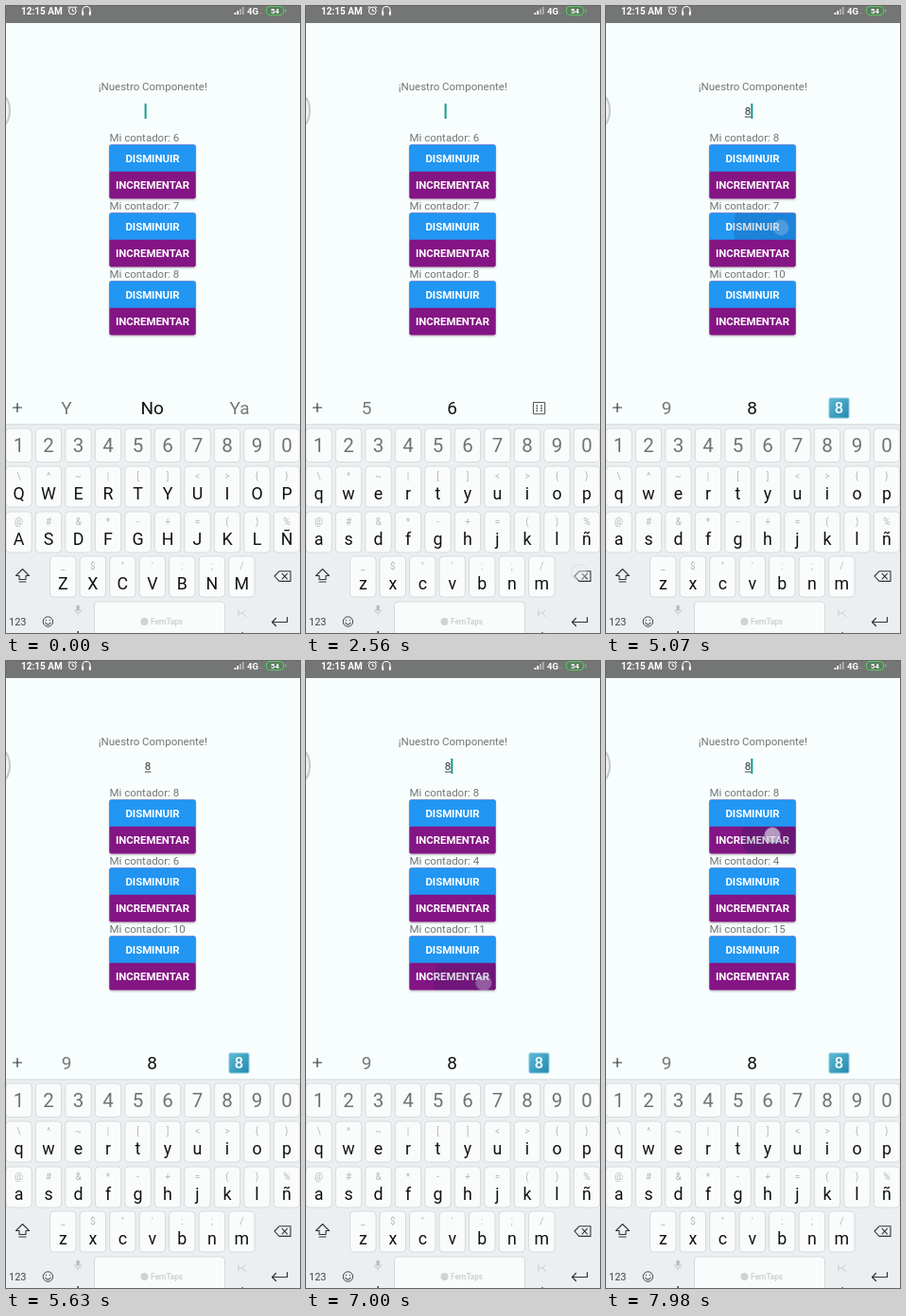
Recreate the animation shown at these times as an HTML page. Size 311x662 px, loop 8 s.

```html
<!DOCTYPE html>
<html lang="es">
<head>
<meta charset="utf-8">
<title>Contadores</title>
<style>
  html, body { margin: 0; width: 100%; height: 100%; overflow: hidden; background: #f8fefe; }
  svg { display: block; width: 311px; height: 662px; font-family: Roboto, "Noto Sans", sans-serif; }
</style>
</head>
<body>
<svg id="stage" viewBox="0 0 311 662" xmlns="http://www.w3.org/2000/svg"></svg>
<script>
const LOOP = 8000;
const stage = document.getElementById('stage');

const text = (x, y, s, size, fill, extra = '') =>
  `<text x="${x}" y="${y}" font-size="${size}" fill="${fill}" ${extra}>${s}</text>`;
const mid = (x, y, s, size, fill, extra = '') =>
  text(x, y, s, size, fill, 'text-anchor="middle" ' + extra);
const rect = (x, y, w, h, r, fill, extra = '') =>
  `<rect x="${x}" y="${y}" width="${w}" height="${h}" rx="${r}" fill="${fill}" ${extra}/>`;
const line = (d, color, w = 1, extra = '') =>
  `<path d="${d}" fill="none" stroke="${color}" stroke-width="${w}" stroke-linecap="round" stroke-linejoin="round" ${extra}/>`;
const esc = c => c.replace('&', '&amp;').replace('<', '&lt;').replace('>', '&gt;');

function statusBar() {
  const bars = [0, 1, 2, 3].map(i =>
    rect(241.5 + i * 2.8, 7 - i * 2, 1.8, 2 + i * 2, 0, '#fff', i > 1 ? 'opacity=".45"' : '')).join('');
  return rect(0, 0, 311, 18, 0, '#747675') +
    text(16, 9, '12:15 AM', 10, '#fff', 'font-weight="700"') +
    '<circle cx="70.3" cy="5" r="3.9" fill="none" stroke="#fff"/>' +
    line('M70.3 3V5.3H72M65.8 1.8L67.5 .4M74.8 1.8L73.1 .4', '#fff') +
    line('M81 8V4.5A4 4 0 0 1 89 4.5V8', '#fff', 1.1) +
    line('M81.2 6.5V9M88.8 6.5V9', '#fff', 2) + bars +
    text(255, 9, '4G', 9.5, '#fff', 'font-weight="700"') +
    text(268, 8, '..', 7, '#fff', 'opacity=".6"') +
    rect(275.5, .5, 18, 9, 4, '#5f7a62', 'stroke="#58c463" stroke-width="1.2"') +
    rect(295, 3.3, 1.5, 3.4, .7, '#58c463') +
    mid(284.5, 8, '54', 7.8, '#fff', 'font-weight="700"');
}

function counter(i) {
  const y = 146.5 + i * 72;
  const button = (dy, fill, label) =>
    rect(109.5, y + dy, 91, 28.3, 1.6, fill) +
    mid(155, y + dy + 18.5, label, 11.4, '#fff', 'font-weight="700"');
  return text(109.5, y - 3.3, '', 11.5, '#757575', `id="count${i}"`) +
    rect(109.5, y, 91, 56.7, 1.6, '#841584', 'filter="url(#shade)"') +
    button(0, '#2196f3', 'DISMINUIR') + button(28.4, '#841584', 'INCREMENTAR');
}

const PITCH = 31.5;
function key(cx, y, h, id = '') {
  return rect(cx - 13.7, y, 27.4, h, 4, '#fafcfc', `stroke="#d3d7da" stroke-width=".9" ${id && `id="${id}"`}`);
}

function keyRow(x, y, letters, hints) {
  return [...letters].map((c, i) => {
    const cx = x + i * PITCH;
    return key(cx, y, 43) + mid(cx, y + 13.5, esc(hints[i]), 10, '#b4b7b9') +
      mid(cx, y + 35, c, 17.8, '#111', 'class="letter"');
  }).join('');
}

function keyboard() {
  const digits = [...'1234567890'].map((c, i) => {
    const cx = 13.5 + i * PITCH;
    return key(cx, 446, 35.5, 'digit' + c) + mid(cx, 471.2, c, 20.5, '#707375');
  }).join('');
  return rect(0, 441.5, 311, 221, 0, '#eceff1') + rect(0, 441.5, 311, 1, 0, '#d6dadc') +
    digits +
    keyRow(13.5, 486, 'QWERTYUIOP', '\\^~|[]<>{}') +
    keyRow(13.5, 534, 'ASDFGHJKLÑ', '@#&*-+=()%') +
    keyRow(60.3, 581, 'ZXCVBNM', '_$"\':;/') +
    line('M17.5 594.5L10.5 601.5H14V605.5H21V601.5H24.5Z M14 608H21', '#333', 1.1) +
    line('M284 602L289 596.8H301V607.4H289Z M292.2 599.4L297.4 604.8M297.4 599.4L292.2 604.8', '#333', 1.1) +
    text(3, 654, '123', 11, '#444') +
    '<circle cx="44.4" cy="650" r="5.2" fill="none" stroke="#444"/>' +
    line('M42.5 648.4V648.6M46.3 648.4V648.6M41.8 651.2Q44.4 655 47 651.2', '#444', 1.1) +
    rect(74.4, 632.5, 3.4, 6.5, 1.7, '#babdbf') +
    line('M72.6 637.5Q72.8 641 76.1 641T79.6 637.5M76.1 641V643', '#c5c8ca') +
    mid(76, 661.5, ',', 16, '#333') +
    rect(93.5, 629, 138, 40, 4, '#fafcfc', 'stroke="#d3d7da" stroke-width=".9"') +
    '<circle cx="146.5" cy="650" r="4" fill="#d0d3d5"/>' +
    text(153, 653.4, 'FernTaps', 8.2, '#ced1d3', 'font-weight="700"') +
    line('M246 638V644M246 641H250M253 638L250 641L254 645', '#c9cccd') +
    mid(250, 662.5, '.', 16, '#333') +
    line('M297.5 645.5V650.5H281.5M285.5 646.5L281.5 650.5L285.5 654.5', '#333', 1.2);
}

function suggestions() {
  const pips = [422, 424.6, 427.2].map(y => [244.3, 249].map(x =>
    rect(x - .8, y - .8, 1.6, 1.6, .3, '#444')).join('')).join('');
  return line('M7.5 424H16.5M12 419.5V428.5', '#333', 1.2) +
    mid(64, 430.7, '', 19, '#777', 'id="left"') +
    mid(154.7, 430.7, '', 19, '#111', 'id="center"') +
    mid(247, 430.7, '', 19, '#777', 'id="right"') +
    `<g id="dice">${rect(240.5, 418.5, 12.2, 12.2, .6, 'none', 'stroke="#555" stroke-width="1.1"')}${pips}</g>` +
    `<g id="tile">${rect(236, 414, 21, 21, 1.5, 'url(#blue)', 'stroke="#86c6dc" stroke-width="1"')}` +
    mid(246.5, 430.3, '8', 16.5, '#fff', 'font-weight="500"') + '</g>';
}

stage.innerHTML = `
  <defs>
    <filter id="shade" x="-10%" y="-10%" width="120%" height="130%">
      <feDropShadow dx="0" dy="1.2" stdDeviation="1.3" flood-color="#000" flood-opacity=".32"/>
    </filter>
    <linearGradient id="blue" x1="0" y1="0" x2="1" y2="1">
      <stop stop-color="#5bbad6"/><stop offset="1" stop-color="#2589ad"/>
    </linearGradient>
    <clipPath id="clip"><rect id="clipBox" x="109.5" y="0" width="91" height="28.3" rx="1.6"/></clipPath>
  </defs>` +
  rect(0, 0, 311, 662, 0, '#f8fefe') + statusBar() +
  '<ellipse cx="-3" cy="110.5" rx="7" ry="15" fill="#f0f3f3" stroke="#c6c9c9" stroke-width="2"/>' +
  mid(155.3, 89, '¡Nuestro Componente!', 11.5, '#757575') +
  text(146.8, 115.3, '', 11.5, '#333', 'id="value"') +
  rect(146.8, 116.6, 6.5, .9, 0, '#333', 'id="under"') +
  rect(146.6, 103, 2, 16, 0, '#159c8c', 'id="caret"') +
  [0, 1, 2].map(counter).join('') +
  '<g clip-path="url(#clip)"><circle id="ripple" fill="#001a40"/></g>' +
  suggestions() + keyboard() +
  '<circle id="dot" r="8.3" fill="#e9f0f2" stroke="#aab6bc" stroke-width=".8"/>';

const el = {};
stage.querySelectorAll('[id]').forEach(n => el[n.id] = n);
const letters = [...stage.querySelectorAll('.letter')].map(n => [n, n.textContent, n.textContent.toLowerCase()]);
const show = (n, on) => n.setAttribute('visibility', on ? 'visible' : 'hidden');
const set = (n, attrs) => { for (const k in attrs) n.setAttribute(k, attrs[k]); };

// Taps: press time, release time, position, optional button top or digit key.
const MINUS = [4700, 5000, 5400, 5770, 6120];
const PLUS = [6940, 7140, 7340, 7540, 7740];
const TAPS = [
  { down: 1520, up: 1620, x: 171, y: 464, digit: '6' },
  { down: 2430, up: 2510, x: 289, y: 598 },
  { down: 3100, up: 3200, x: 234, y: 464, digit: '8' },
  ...MINUS.map((up, i) => ({ down: up - 90, up, x: i < 2 ? 185 : 182, y: 234, top: 218.5 })),
  ...PLUS.map(up => ({ down: up - 110, up, x: 188, y: 340, top: 318.9 })),
  { down: 7890, up: 8010, x: 176, y: 184, top: 174.9 }
];
const BLINKS = [400, 910, 1350, 1600, 2140, 2520, 3790, 4250, 4650, 5050, 5500, 5920, 6340, 6830, 7300, 7780];
const clamp = v => Math.max(0, Math.min(1, v));
const passed = (times, t, lag = 0) => times.filter(s => t >= s + lag).length;

const WORDS = { '': ['Y', 'No', 'Ya'], 6: ['5', '6', ''], 8: ['9', '8', ''] };

function draw(t) {
  const value = t < 1600 ? '' : t < 2520 ? '6' : t < 3190 ? '' : '8';
  const hint = t < 1640 ? '' : t < 2590 ? '6' : t < 3210 ? '' : '8';
  const base = t < 3230 ? 6 : 8;
  const counts = [base, base + 1 - passed(MINUS, t, 15), base + 2 + passed(PLUS, t, 15)];
  counts.forEach((n, i) => el['count' + i].textContent = 'Mi contador: ' + n);

  el.value.textContent = value;
  show(el.under, value);
  set(el.caret, { x: value ? 153.3 : 146.6 });
  show(el.caret, passed(BLINKS, t) % 2 === 0);

  ['left', 'center', 'right'].forEach((id, i) => el[id].textContent = WORDS[hint][i]);
  show(el.dice, hint === '6');
  show(el.tile, hint === '8');
  letters.forEach(([n, upper, lower]) => n.textContent = hint ? lower : upper);

  const tap = TAPS.filter(p => t >= p.down).pop();
  const since = tap ? t - tap.up : 1e4;
  const fade = 1 - clamp((since - 25) / 75);
  show(el.dot, fade > 0);
  show(el.ripple, tap && tap.top && since < 250);
  for (const d of ['6', '8'])
    set(el['digit' + d], { fill: tap && tap.digit === d && since < 60 ? '#d9dee1' : '#fafcfc' });
  if (!tap) return;
  const rise = clamp((t - tap.down) / 40);
  set(el.dot, { cx: tap.x, cy: tap.y, opacity: .6 * rise * fade });
  if (tap.top) {
    set(el.clipBox, { y: tap.top });
    set(el.ripple, {
      cx: tap.x, cy: tap.y,
      r: 10 + 80 * clamp((t - tap.down) / 320),
      opacity: .2 * rise * (1 - clamp(since / 250))
    });
  }
}

function frame(now) {
  draw(now % LOOP);
  requestAnimationFrame(frame);
}
draw(0);
requestAnimationFrame(frame);
</script>
</body>
</html>
```
